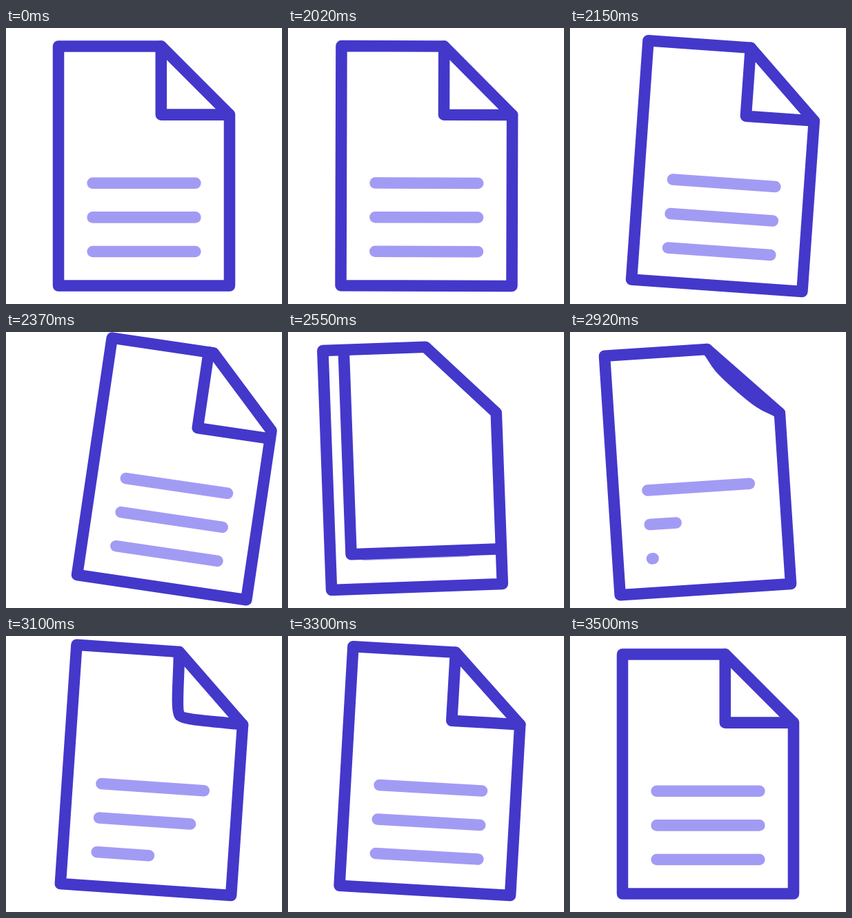
An HTML page with a canvas that plays this animation: 400 px wide and 400 px high, repeating every 3520 ms.

```html
<!DOCTYPE html>
<html lang="en">
<head>
<meta charset="utf-8">
<title>Document page flip</title>
<style>
  html, body { margin: 0; width: 100%; height: 100%; overflow: hidden; background: #fff; }
  canvas { display: block; }
</style>
</head>
<body>
<canvas id="stage" width="400" height="400"></canvas>
<script>
const ctx = document.getElementById('stage').getContext('2d');
const LOOP = 3520, STEP = 25;
const UNIT = 16.53; // line width; all shapes are laid out in this unit around the page centre
const INK = '#4338ca', SOFT = '#a29bf4', PAPER = '#fff';

// Keys: [time, value, velocity per ms]
const swayX = [[2000, 200, 0], [2320, 255, 0], [2375, 251, -.2], [2550, 180.6, -.29],
  [2750, 160.5, 0], [3125, 215, 0], [3500, 200, 0]];
const swayY = [[2000, 200, 0], [2320, 199.4, -.01], [2375, 198.4, -.02], [2550, 196, 0],
  [2750, 200.8, .03], [2785, 202, 0], [3100, 194.4, -.03], [3160, 193, 0], [3500, 200, 0]];
const tilt = [[2000, 0, 0], [2320, 8.9, 0], [2375, 8.4, -.02], [2550, -2.1, -.05],
  [2750, -6.9, -.02], [2785, -7.5, 0], [3170, 5, 0], [3500, 0, 0]];

const FLIP = [2335, 2638], CURL = [2850, 3180], REWRITE = 2580;
const textLines = [
  { y: 1.5, grow: [2585, 2942] },
  { y: 4.5, grow: [2800, 3178] },
  { y: 7.5, grow: [2900, 3296] }
];

const mix = (a, b, p) => a + (b - a) * p;

function ease(t, [start, end]) {
  const u = Math.min(1, Math.max(0, (t - start) / (end - start)));
  return u * u * (3 - 2 * u);
}

function sample(keys, t) {
  if (t <= keys[0][0]) return keys[0][1];
  const i = keys.findIndex(key => key[0] >= t);
  if (i < 0) return keys[keys.length - 1][1];
  const [t0, v0, s0] = keys[i - 1], [t1, v1, s1] = keys[i];
  const d = t1 - t0, u = (t - t0) / d, w = 1 - u;
  return v0 * w * w * (1 + 2 * u) + v1 * u * u * (3 - 2 * u)
    + d * u * w * (s0 * w - s1 * u);
}

function trace(points, closed) {
  ctx.beginPath();
  points.forEach(([x, y]) => ctx.lineTo(x, y));
  if (closed) ctx.closePath();
}

function stroke(color) {
  ctx.strokeStyle = color;
  ctx.stroke();
}

function drawLines(t) {
  for (const { y, grow } of textLines) {
    const length = t < REWRITE ? 1 : ease(t, grow);
    if (!length) continue;
    trace([[-4.5, y], [-4.5 + 9 * length, y]]);
    stroke(SOFT);
  }
}

// The turning sheet hides the old text as its corner sweeps down and left.
function drawFlap(t) {
  const p = ease(t, FLIP);
  const x = mix(1.5, -7.5, p), y = mix(-4.5, 10.5, p);
  if (t < REWRITE) {
    trace([[x, -10.5], [1.5, -10.5], [7.5, -4.5], [7.5, y], [x, y]], true);
    ctx.fillStyle = PAPER;
    ctx.fill();
  }
  trace([[x, -10.5], [x, y], [7.5, y]]);
  stroke(INK);
}

// The new corner bends away from the diagonal until it is a sharp fold.
function drawCurl(t) {
  const p = ease(t, CURL);
  const x = mix(4.5, 1.5, p), y = mix(-7.5, -4.5, p);
  const bend = 2.8 * (1 - p), along = mix(1, 2, p), across = 1 - p;
  ctx.beginPath();
  ctx.moveTo(1.5, -10.5);
  ctx.bezierCurveTo(1.5 + across, -10.5 + along, x - bend, y - bend, x, y);
  ctx.bezierCurveTo(x + bend, y + bend, 7.5 - along, -4.5 - across, 7.5, -4.5);
  stroke(INK);
}

function draw(t) {
  ctx.setTransform(1, 0, 0, 1, 0, 0);
  ctx.fillStyle = PAPER;
  ctx.fillRect(0, 0, 400, 400);
  ctx.translate(sample(swayX, t), sample(swayY, t));
  ctx.rotate(sample(tilt, t) * Math.PI / 180);
  ctx.scale(UNIT, UNIT);
  ctx.lineWidth = 1;
  ctx.lineCap = ctx.lineJoin = 'round';

  drawLines(t);
  if (t < FLIP[1]) drawFlap(t);
  else drawCurl(t);
  trace([[-7.5, -10.5], [1.5, -10.5], [7.5, -4.5], [7.5, 10.5], [-7.5, 10.5]], true);
  stroke(INK);
}

function tick() {
  const t = performance.now() % LOOP;
  // Steps of 25 ms whose starts fall on whole 10 ms marks.
  draw(Math.floor((Math.floor(t / 10) * 10 + 5) / STEP) * STEP);
  requestAnimationFrame(tick);
}
tick();
</script>
</body>
</html>
```
